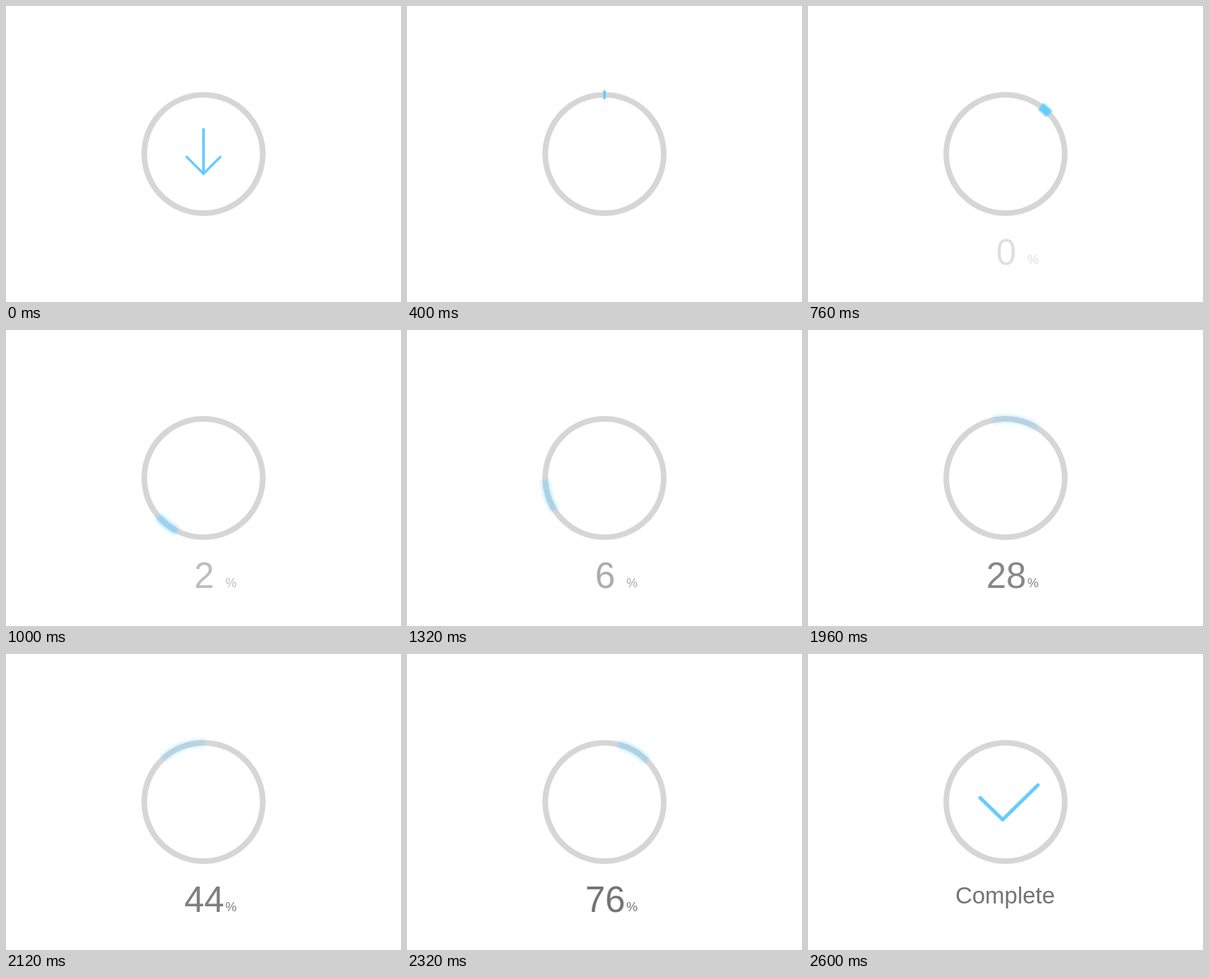
Recreate the animation shown at these times as an HTML page with a canvas. Size 560x420 px, loop 4000 ms.

```html
<!DOCTYPE html>
<html lang="en">
<head>
<meta charset="utf-8">
<title>Download progress</title>
<style>
  html, body { margin: 0; width: 100%; height: 100%; overflow: hidden; background: #fff; }
  canvas { display: block; }
</style>
</head>
<body>
<canvas id="stage" width="560" height="420"></canvas>
<script>
const ctx = document.getElementById('stage').getContext('2d');
const LOOP = 4000, STEP = 40;
const CX = 280, CY = 210, R = 84;
const BLUE = '#66ccff', RING = '#d6d6d6';
const FONT = '"Liberation Sans", Arial, sans-serif';

// Keys: [time in ms, value, slope per step]
const SPIN = [
  [560, 0, 0], [1000, 218, 42], [1640, 1143, 76], [1960, 1810, 84],
  [2240, 2388, 85], [2320, 2550, 55], [2520, 2690, 0]
];
const COUNT = [
  [600, 0, 0], [1000, 2, 0.4], [1640, 14, 1.2], [1960, 28, 3],
  [2320, 76, 8], [2440, 100, 8]
];

const clamp = x => Math.max(0, Math.min(1, x));
const mix = (a, b, p) => a + (b - a) * p;
const span = (t, a, b) => clamp((t - a) / (b - a));
const easeOut = p => 1 - (1 - p) ** 3;
const easeInOut = p => p < 0.5 ? 4 * p ** 3 : 1 - 4 * (1 - p) ** 3;

function hermite(keys, t) {
  if (t <= keys[0][0]) return keys[0][1];
  const i = keys.findIndex(k => k[0] > t);
  if (i < 0) return keys[keys.length - 1][1];
  const [t0, v0, s0] = keys[i - 1], [t1, v1, s1] = keys[i];
  const n = (t1 - t0) / STEP, p = (t - t0) / (t1 - t0), q = 1 - p;
  return v0 * (1 + 2 * p) * q * q + s0 * n * p * q * q
       + v1 * (3 - 2 * p) * p * p - s1 * n * p * p * q;
}

function line(points, width) {
  ctx.strokeStyle = BLUE;
  ctx.lineWidth = width;
  ctx.lineCap = ctx.lineJoin = 'round';
  ctx.beginPath();
  points.forEach(([x, y]) => ctx.lineTo(x, y));
  ctx.stroke();
}

function text(str, x, y, size, align) {
  ctx.font = `${size}px ${FONT}`;
  ctx.textAlign = align;
  ctx.fillText(str, x, y);
}

function drawRing() {
  ctx.strokeStyle = RING;
  ctx.lineWidth = 8;
  ctx.beginPath();
  ctx.arc(CX, CY, R, 0, Math.PI * 2);
  ctx.stroke();
}

function drawArrow(t) {
  const p = easeInOut(span(t, 0, 400));
  const tip = mix(238, 130.5, p);
  const arm = 24 * (1 - easeInOut(span(t, 0, 280)));
  line([[CX, mix(175, 121.5, p)], [CX, tip]], 3.8);
  if (arm > 0.5) line([[CX - arm, tip - arm], [CX, tip], [CX + arm, tip - arm]], 3.3);
}

// The mark is smeared along the ring in proportion to its speed.
function drawMark(t) {
  const speed = hermite(SPIN, t + STEP / 2) - hermite(SPIN, t - STEP / 2);
  const length = 2.7 + speed / 2;
  const mid = hermite(SPIN, t) - 90;
  const rad = Math.PI / 180;
  ctx.save();
  ctx.globalAlpha = Math.min(1, 12 / length) * (1 - span(t, 2360, 2480));
  ctx.filter = `blur(${Math.min(2, speed / 14)}px)`;
  ctx.strokeStyle = BLUE;
  ctx.lineWidth = 12;
  ctx.lineCap = 'butt';
  ctx.beginPath();
  ctx.arc(CX, CY, R, (mid - length / 2) * rad, (mid + length / 2) * rad);
  ctx.stroke();
  ctx.restore();
}

function drawCount(t) {
  const p = span(t, 560, 880), out = span(t, 2360, 2480);
  const y = 366 + 22 * (1 - easeOut(p)) + 22 * out * out;
  const grey = Math.round(mix(214, 116, span(t, 560, 2320)));
  ctx.save();
  ctx.globalAlpha = p * (1 - out);
  ctx.fillStyle = `rgb(${grey}, ${grey}, ${grey})`;
  text(Math.round(hermite(COUNT, t)), 281, y, 51, 'center');
  text('%', 311, y - 1, 18, 'left');
  ctx.restore();
}

function drawCheck(t) {
  const p = easeOut(span(t, 2400, 2600));
  const a = [244, 204], b = [276, 235], c = [326, 186];
  const split = 0.39;
  const toward = (u, v, k) => [mix(u[0], v[0], k), mix(u[1], v[1], k)];
  const points = [a, toward(a, b, clamp(p / split))];
  if (p > split) points.push(toward(b, c, (p - split) / (1 - split)));
  line(points, 5.2);
}

function drawComplete(t) {
  const p = span(t, 2400, 2600);
  ctx.save();
  ctx.globalAlpha = p;
  ctx.fillStyle = '#747474';
  text('Complete', 279.5, 354 + 29 * (1 - easeOut(p)), 33, 'center');
  ctx.restore();
}

function draw(t) {
  ctx.fillStyle = '#fff';
  ctx.fillRect(0, 0, 560, 420);
  drawRing();
  if (t < 600) {
    drawArrow(t);
  } else if (t < 2480) {
    drawMark(t);
    drawCount(t);
  }
  if (t > 2400) {
    drawCheck(t);
    drawComplete(t);
  }
}

const start = performance.now();
function tick() {
  const t = (performance.now() - start) % LOOP;
  draw(Math.floor(t / STEP) * STEP);
  requestAnimationFrame(tick);
}
tick();
</script>
</body>
</html>
```
